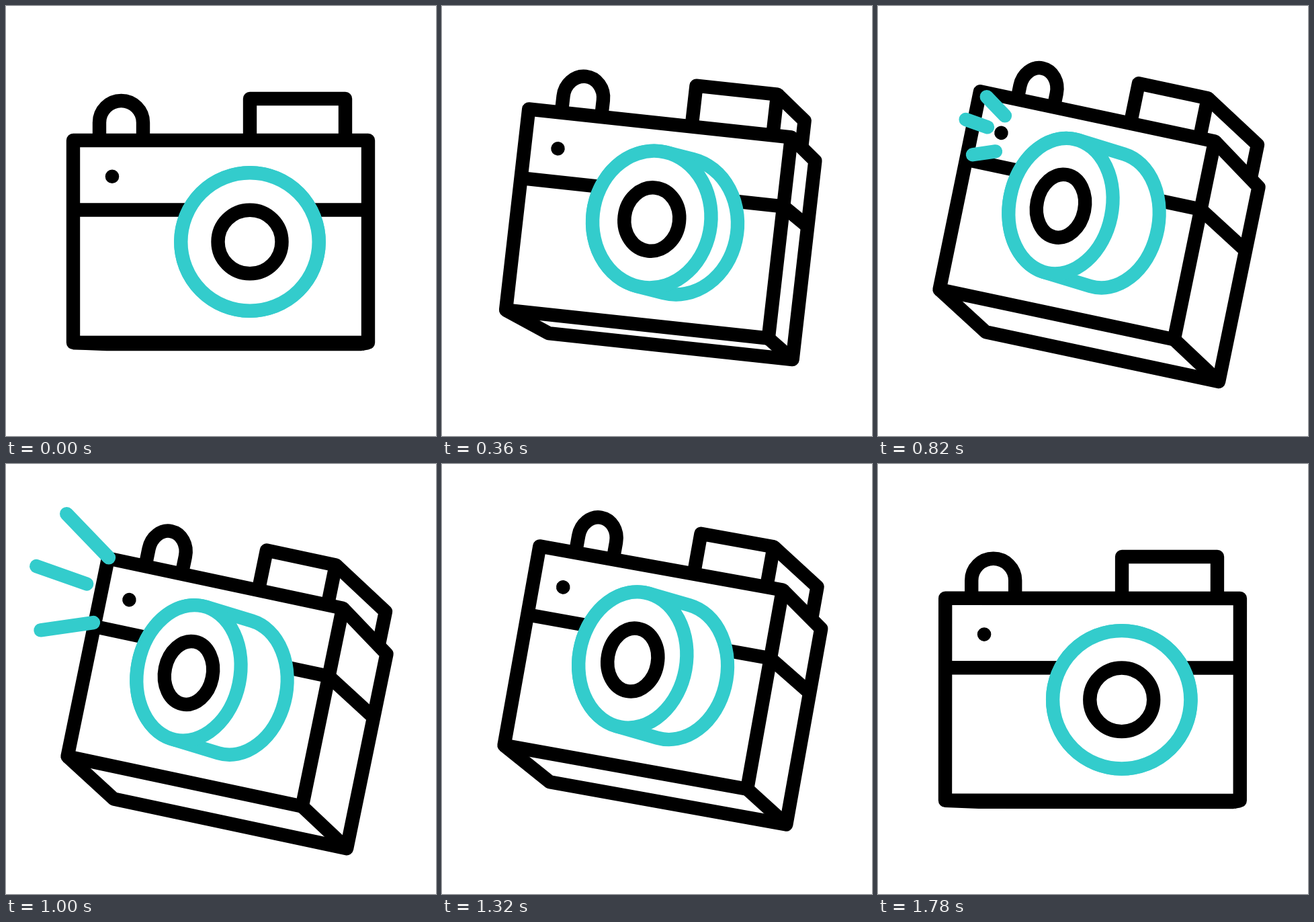
Write an HTML page with a canvas that moves like this. It is 640x640 px and loops after 2400 ms.

```html
<!DOCTYPE html>
<html>
<head>
<meta charset="utf-8">
<title>Camera</title>
<style>
html, body { margin: 0; width: 100%; height: 100%; overflow: hidden; background: #fff; }
canvas { display: block; width: 640px; height: 640px; }
</style>
</head>
<body>
<canvas id="stage" width="640" height="640"></canvas>
<script>
const ctx = document.getElementById('stage').getContext('2d');
const BLACK = '#000', TEAL = '#33cccc', WHITE = '#fff';
const LOOP = 2400, HEIGHT = 301, STRIPE = 103.5, DEGREE = Math.PI / 180;

// Flash rays: start and end, relative to the dot
const RAYS = [
  [5.5, -25.5, -114.5, -150],
  [-20.5, -8.5, -163.5, -59],
  [-8.5, 27.5, -158.5, 49]
];

const mix = (a, b, k) => a + (b - a) * k;

// Smooth ramp from 0 to 1 between two times
function ramp(t, from, to) {
  const x = Math.min(1, Math.max(0, (t - from) / (to - from)));
  return x * x * (3 - 2 * x);
}

function paint(color, fill) {
  if (fill) {
    ctx.fillStyle = WHITE;
    ctx.fill();
  }
  ctx.strokeStyle = color;
  ctx.stroke();
}

function line(points, { color = BLACK, fill = false, close = false } = {}) {
  ctx.beginPath();
  for (const [x, y] of points) ctx.lineTo(x, y);
  if (close) ctx.closePath();
  paint(color, fill);
}

function ring(x, y, rx, ry, color) {
  ctx.beginPath();
  ctx.ellipse(x, y, rx, ry, 0, 0, 2 * Math.PI);
  paint(color, true);
}

function drawButton(p, press) {
  const left = mix(39, 56.5, p), right = mix(104, 112, p);
  const y = press + 7 * p * (1 - p);
  ctx.beginPath();
  ctx.moveTo(left, y);
  ctx.ellipse((left + right) / 2, y - 26.5, (right - left) / 2, 32.5, 0, Math.PI, 2 * Math.PI);
  ctx.lineTo(right, y);
  paint(BLACK, true);
}

function drawFinder(p) {
  const left = mix(263, 228.7, p), right = mix(405, 334, p), top = mix(-62, -60.7, p);
  const backX = mix(396, 420.5, p);
  line([[right, top], [backX, mix(-50, -8.3, p)], [backX, 44 * p]]);
  line([[left, 0], [left, top], [right, top], [right, 0]], { fill: true });
}

function drawBody(p) {
  const w = mix(439, 357, p), backX = mix(429, 434.7, p);
  const backTop = mix(3, 53, p), backBottom = mix(303, 348.5, p);
  line([[0, HEIGHT], [mix(50, 80.3, p), backBottom], [backX, backBottom],
        [backX, backTop], [w, 0]], { fill: true });
  line([[w, HEIGHT], [backX, backBottom]]);
  line([[w, STRIPE], [backX, STRIPE + 46 * p]]);
  line([[0, 0], [w, 0], [w, HEIGHT], [0, HEIGHT]], { fill: true, close: true });
  line([[0, STRIPE], [w, STRIPE]]);
}

function drawLens(p) {
  const x = mix(263, 151.8, p), y = mix(151, 141.8, p * (2 - p));
  const backX = mix(263, 223.7, p), backY = mix(151, 148, p);
  const rx = mix(102.7, 76.5, p), ry = mix(102.7, 101.6, p);
  // Barrel: half of each rim, joined by tangents
  const a = Math.atan2((x - backX) / rx, (backY - y) / ry);
  ctx.beginPath();
  ctx.ellipse(backX, backY, rx, ry, 0, a, a + Math.PI);
  ctx.ellipse(x, y, rx, ry, 0, a + Math.PI, a + 2 * Math.PI);
  ctx.closePath();
  paint(TEAL, true);
  ring(x, y, rx, ry, TEAL);
  ring(x, y, mix(47.5, 35.7, p), 47.3, BLACK);
}

function drawRays(t, x, y) {
  const head = ramp(t, 690, 1115), tail = ramp(t, 845, 1275);
  if (head <= tail) return;
  ctx.lineCap = 'round';
  for (const [x0, y0, x1, y1] of RAYS) {
    line([tail, head].map(k => [x + mix(x0, x1, k), y + mix(y0, y1, k)]), { color: TEAL });
  }
}

function draw(t) {
  const back = ramp(t, 1183, 1800);
  const turn = ramp(t, 0, 667) - back;
  const rise = ramp(t, 0, 700) - back;
  const dip = 33 * (ramp(t, 695, 950) - ramp(t, 950, 1200));
  const press = 12 * (ramp(t, 640, 760) - ramp(t, 760, 880));
  const left = 100 + 52 * turn, top = 200 - 89 * rise + dip;
  // Horizontal edges tilt slightly later than vertical ones lean
  const tilt = 12 * turn * (0.8 + 0.2 * turn) * DEGREE, lean = 11.6 * turn * DEGREE;
  const dotX = mix(58, 43.2, turn), dotY = 53.8;

  ctx.setTransform(1, 0, 0, 1, 0, 0);
  ctx.fillStyle = WHITE;
  ctx.fillRect(0, 0, 640, 640);
  ctx.lineWidth = 20.4;
  ctx.lineJoin = 'round';
  ctx.lineCap = 'butt';

  ctx.setTransform(Math.cos(tilt), Math.sin(tilt), -Math.sin(lean), Math.cos(lean), left, top);
  drawButton(turn, press);
  drawFinder(turn);
  drawBody(turn);
  drawLens(turn);
  ctx.beginPath();
  ctx.arc(dotX, dotY, 10.3, 0, 2 * Math.PI);
  ctx.fillStyle = BLACK;
  ctx.fill();

  const dot = ctx.getTransform().transformPoint({ x: dotX, y: dotY });
  ctx.setTransform(1, 0, 0, 1, 0, 0);
  drawRays(t, dot.x, dot.y);
}

const start = performance.now();
function tick() {
  draw((performance.now() - start) % LOOP);
  requestAnimationFrame(tick);
}
tick();
</script>
</body>
</html>
```
